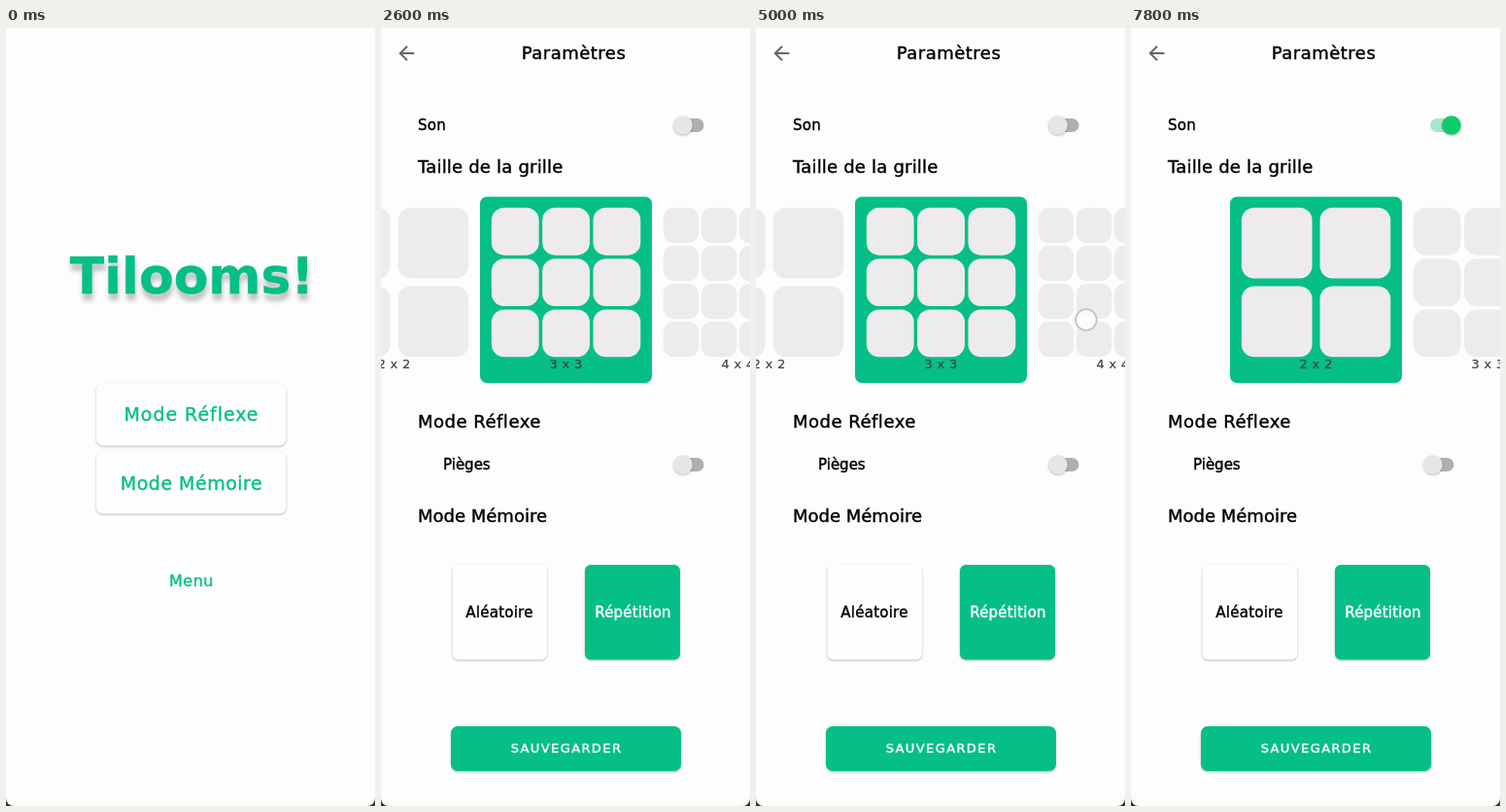
These frames come from a looping animation (380x800 px, 8 s). An HTML page:

```html
<!DOCTYPE html>
<html lang="fr">
<head>
<meta charset="utf-8">
<title>Tilooms!</title>
<style>
  html, body { margin: 0; width: 100%; height: 100%; overflow: hidden; background: #333; }
  svg { display: block; width: 380px; height: 800px; border-radius: 0 0 8px 8px; background: #fdfdfd; }
  text { font-family: "DejaVu Sans", Verdana, sans-serif; fill: #000; stroke: #000; stroke-width: .4px; }
  .green { fill: #05bf87; }
  .white { fill: #fefefe; }
  .tile { fill: #eeebec; }
  text.green { stroke: #05bf87; }
  text.white { stroke: #fefefe; }
  text.label { fill: #444; stroke: #444; stroke-width: .2px; }
  .raised { filter: drop-shadow(0 1.5px 1.2px rgba(0, 0, 0, .27)); }
  .title { font-weight: bold; filter: drop-shadow(1px 7px 2.5px rgba(0, 0, 0, .24)); }
  #settings { clip-path: url(#page); }
</style>
</head>
<body>
<svg viewBox="0 0 380 800">
  <clipPath id="page"><rect width="380" height="800"/></clipPath>
  <g id="home"></g>
  <rect id="shade" width="380" height="800"/>
  <g id="settings"></g>
  <circle id="touch" r="10.8" fill="#fff" fill-opacity=".82" stroke="#c4c2c8" stroke-width="1.8"/>
</svg>
<script>
const LOOP = 8000, STEP = 200, CARD = 177, SELECT_AT = 6000, SOUND_AT = 7200;
const $ = id => document.getElementById(id);

const box = (x, y, w, h, r, cls) =>
  `<rect x="${x}" y="${y}" width="${w}" height="${h}" rx="${r}" class="${cls}"/>`;

const text = (str, x, y, size, { anchor = 'start', spacing = 0, cls = '' } = {}) =>
  `<text x="${x}" y="${y}" font-size="${size}" text-anchor="${anchor}" letter-spacing="${spacing}"
    class="${cls}">${str}</text>`;

const centered = (str, x, y, size, options) =>
  text(str, x, y, size, { anchor: 'middle', ...options });

const toggle = (id, y) => `<g id="${id}">
  ${box(308, y - 7, 24.5, 14, 7, 'track')}
  <circle class="knob raised" cy="${y}" r="9.8"/></g>`;

function gridCard(n) {
  const x = (n - 3) * CARD + 102;
  const gap = { 2: 8, 3: 3.5, 4: 2.5 }[n];
  const size = (153.5 - gap * (n - 1)) / n;
  let out = `<rect id="card${n}" x="${x}" y="173.5" width="${CARD}" height="191.5" rx="7" class="green"/>`;
  for (let i = 0; i < n * n; i++) {
    const col = i % n, row = Math.floor(i / n);
    out += box(x + 11.8 + col * (size + gap), 184.8 + row * (size + gap), size, size, n === 4 ? 11 : 13, 'tile');
  }
  return out + centered(`${n} x ${n}`, x + 88.5, 350, 13, { spacing: .3, cls: 'label' });
}

$('home').innerHTML =
  centered('Tilooms!', 191.5, 273, 52, { cls: 'green title' }) +
  box(93, 366, 195.5, 63.5, 7, 'white raised') +
  box(93, 436, 195.5, 63.5, 7, 'white raised') +
  centered('Mode Réflexe', 191, 404, 19, { spacing: .95, cls: 'green' }) +
  centered('Mode Mémoire', 191, 475, 19, { spacing: .5, cls: 'green' }) +
  centered('Menu', 191, 574, 16, { spacing: .5, cls: 'green' });

$('settings').innerHTML =
  '<rect width="380" height="800" fill="#fdfdfd"/>' +
  '<path transform="translate(14.3 14)" fill="#666" d="M20 11H7.8l5.6-5.6L12 4l-8 8 8 8 1.4-1.4L7.8 13H20z"/>' +
  centered('Paramètres', 198.5, 32, 18, { spacing: .5 }) +
  text('Son', 38, 105, 15, { spacing: .3 }) + toggle('sound', 100) +
  text('Taille de la grille', 38, 149, 18, { spacing: .2 }) +
  `<g id="carousel">${[2, 3, 4].map(gridCard).join('')}</g>` +
  text('Mode Réflexe', 38, 411, 18, { spacing: .5 }) +
  text('Pièges', 64, 454, 15) + toggle('traps', 449) +
  text('Mode Mémoire', 38, 508, 18) +
  box(73.5, 552, 97.5, 97.5, 6, 'white raised') +
  box(210, 552, 98, 97.5, 6, 'green raised') +
  centered('Aléatoire', 122, 606, 15, { spacing: .25 }) +
  centered('Répétition', 259.5, 606, 15, { spacing: .2, cls: 'white' }) +
  box(72, 718, 237, 46, 7, 'green raised') +
  centered('SAUVEGARDER', 191, 745, 13, { spacing: 1.4, cls: 'white' });

// Piecewise linear interpolation through [time, value] points.
function follow(points, t) {
  const i = points.findIndex(p => p[0] > t);
  if (i === 0) return points[0][1];
  if (i < 0) return points[points.length - 1][1];
  const [t0, a] = points[i - 1], [t1, b] = points[i];
  return a + (b - a) * (t - t0) / (t1 - t0);
}

const scroll = [[600, -72.5], [1000, 0], [3200, 0], [3600, -51], [3800, -102], [4000, -160],
  [4200, -CARD], [4600, -CARD], [4800, -100], [5000, 0], [5200, 125], [5400, CARD]];

const gestures = [
  { from: 200, to: 350, x0: 191, y0: 568, x1: 191, y1: 568 },
  { from: 3200, to: 3800, x0: 290, y0: 314, x1: 212, y1: 305 },
  { from: 4600, to: 5000, x0: 182, y0: 302, x1: 340, y1: 300 },
  { from: 5800, to: 5900, x0: 190, y0: 262, x1: 190, y1: 262 },
  { from: 7000, to: 7200, x0: 332, y0: 103, x1: 332, y1: 103 }
];

function setToggle(id, on) {
  const [track, knob] = $(id).children;
  track.style.fill = on ? '#a9e5cb' : '#b0afaf';
  knob.style.fill = on ? '#0ccd69' : '#e7e5e6';
  knob.setAttribute('cx', on ? 330 : 311);
}

function draw(t) {
  const u = Math.min(1, Math.max(0, (t - 300) / 720));
  const slide = 1 - (1 - u) ** 3;
  $('home').setAttribute('transform', `translate(${-96 * slide} 0)`);
  $('shade').setAttribute('opacity', .67 * slide);
  $('settings').setAttribute('transform', `translate(${380 * (1 - slide)} 0)`);
  $('carousel').setAttribute('transform', `translate(${follow(scroll, t)} 0)`);

  const selected = t < SELECT_AT ? 3 : 2;
  for (const n of [2, 3, 4]) $('card' + n).style.display = n === selected ? '' : 'none';
  setToggle('sound', t >= SOUND_AT);
  setToggle('traps', false);

  const g = gestures.find(g => t >= g.from && t <= g.to);
  $('touch').style.display = g ? '' : 'none';
  if (g) {
    $('touch').setAttribute('cx', follow([[g.from, g.x0], [g.to, g.x1]], t));
    $('touch').setAttribute('cy', follow([[g.from, g.y0], [g.to, g.y1]], t));
  }
}

const start = performance.now();
function tick() {
  const t = (performance.now() - start) % LOOP;
  draw(Math.floor(t / STEP) * STEP);
  requestAnimationFrame(tick);
}
tick();
</script>
</body>
</html>
```
